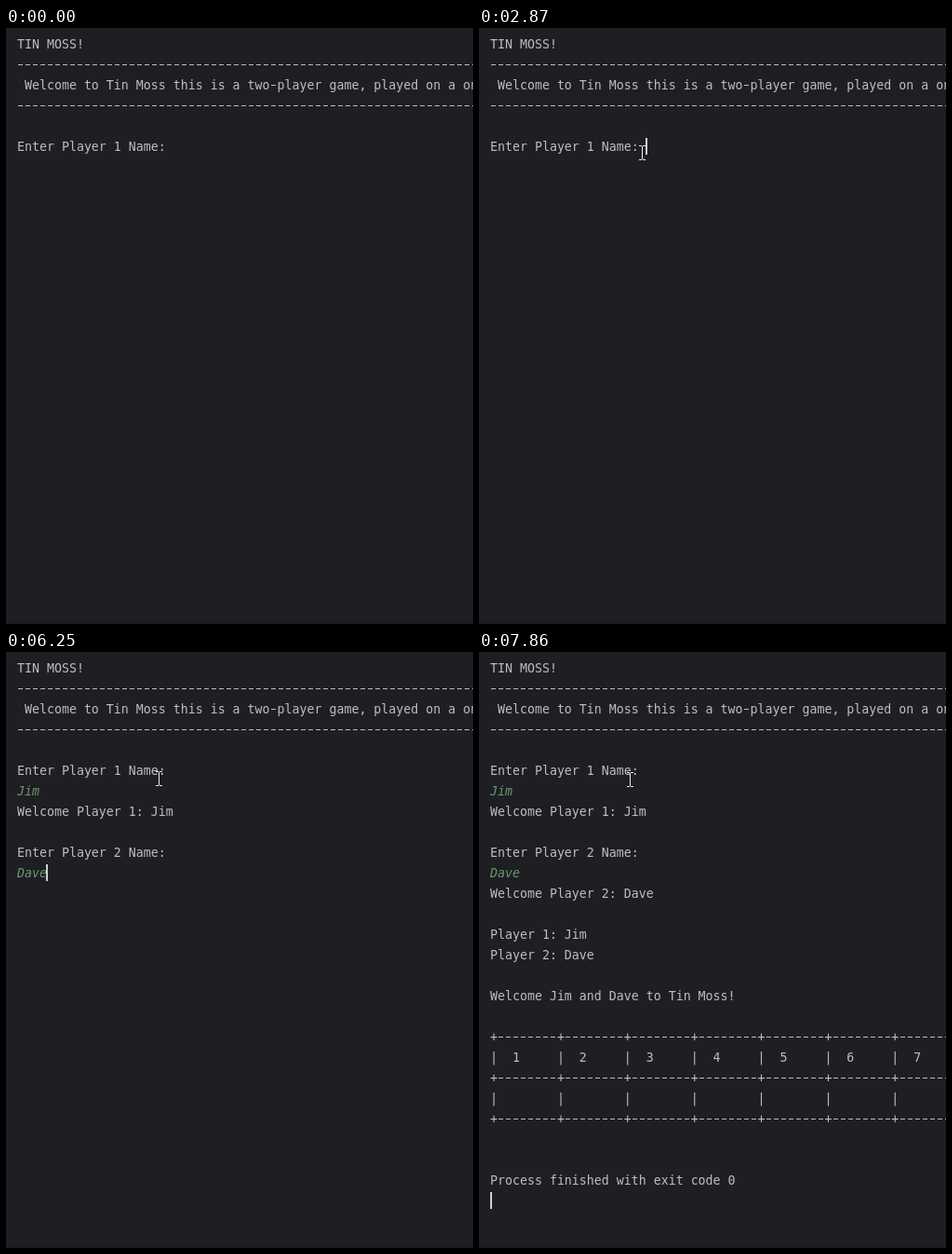
Write an HTML page with a canvas that moves like this. It is 502 px wide and 640 px high and loops after 8 s.

```html
<!DOCTYPE html>
<html lang="en">
<head>
<meta charset="utf-8">
<title>Console game</title>
<style>
html, body { margin: 0; width: 100%; height: 100%; overflow: hidden; background: #1e1f22; }
canvas { display: block; }
</style>
</head>
<body>
<canvas width="502" height="640"></canvas>
<script>
const ctx = document.querySelector("canvas").getContext("2d", { alpha: false });
const LOOP = 8000, TICK = 67, LEFT = 12, TOP = 8, CELL = 8, LINE = 22;
const FONT = "13.288px 'DejaVu Sans Mono', monospace";
const PLAIN = "#bcbec4", INPUT = "#6c9570";

// The console is a log of timed strings; the caret sits at its end.
const log = [];
const inputRows = [6, 10];

function print(time, text) {
  log.push({ time, text });
}

function type(start, name, gap, slowdown) {
  [...name].forEach((key, i) => print(start + gap * i + slowdown * i * i, key));
}

const rule = "-".repeat(62);
const border = "+--------".repeat(7) + "\n";
const numbers = Array.from({ length: 7 }, (_, i) => `|  ${i + 1}     `).join("") + "\n";
const blanks = "|        ".repeat(7) + "\n";

print(0, `TIN MOSS!\n${rule}\n Welcome to Tin Moss this is a two-player game, played on a one\n${rule}\n\n`);
print(0, "Enter Player 1 Name: ");
print(3730, "\n");
type(3730, "Jim", 135, 65);
print(4860, "\n");
print(5120, "Welcome Player 1: Jim\n\nEnter Player 2 Name: \n");
type(5860, "Dave", 130, 0);
print(6990, "\nWelcome Player 2: Dave\n\nPlayer 1: Jim\nPlayer 2: Dave\n\n");
print(6990, "Welcome Jim and Dave to Tin Moss!\n\n" + border);
print(7180, numbers + border + blanks + border + "\n");
print(7720, "\nProcess finished with exit code 0\n");

// Each move runs in ticks from the place where the previous one ended.
const pointerStart = { x: 370, y: 436 };
const moves = [
  { from: 1460, to: 2070, x: 187, y: 135, ease: 1.5 },
  { from: 2210, to: 2330, x: 182, y: 123, ease: 1 },
  { from: 2870, to: 2930, x: 161, y: 128, ease: 1 },
  { from: 7860, to: 7860, x: 159, y: 129, ease: 1 },
];

const between = (t, from, to) => t >= from && t < to;

function drawLine(text, row) {
  const y = TOP + row * LINE, isInput = inputRows.includes(row);
  ctx.font = (isInput ? "italic " : "") + FONT;
  ctx.fillStyle = isInput ? INPUT : PLAIN;
  ctx.fillText(text.replaceAll("-", " "), LEFT, y + 14);
  // Hyphens are wider than the font's own
  [...text].forEach((char, col) => {
    if (char === "-") ctx.fillRect(LEFT + col * CELL + 1, y + 9, 5, 1);
  });
}

function drawCaret(t, row, col) {
  if (t < 2540 || between(t, 3070, 3530)) return;
  ctx.fillStyle = "#ced0d6";
  ctx.fillRect(LEFT + col * CELL - (col ? 1 : 0), TOP + row * LINE, 2, 18);
}

function drawClick(t) {
  if (!between(t, 2540, 2730)) return;
  ctx.fillStyle = "rgba(255, 255, 0, .47)";
  ctx.beginPath();
  ctx.arc(183, 130, 12, 0, 2 * Math.PI);
  ctx.fill();
}

function drawPointer(t) {
  if (t < moves[0].from) return;
  let { x, y } = pointerStart;
  for (const move of moves.filter(m => t >= m.from)) {
    const steps = Math.round((move.to - move.from) / TICK) + 1;
    const step = Math.min(steps, Math.floor((t - move.from) / TICK + 0.1) + 1);
    const left = (1 - step / steps) ** move.ease;
    x = Math.round(move.x + (x - move.x) * left);
    y = Math.round(move.y + (y - move.y) * left);
  }
  ctx.fillStyle = "#f0f0f0";
  for (const end of [y, y + 15]) {
    ctx.fillRect(x, end, 3, 1);
    ctx.fillRect(x + 4, end, 3, 1);
  }
  ctx.fillRect(x + 3, y + 1, 1, 14);
}

function draw(t) {
  ctx.fillStyle = "#1e1f22";
  ctx.fillRect(0, 0, 502, 640);
  ctx.fillStyle = "#1c1c23";
  ctx.fillRect(0, 635, 502, 5);

  const lines = log.filter(entry => t >= entry.time).map(entry => entry.text).join("").split("\n");
  lines.forEach(drawLine);
  drawCaret(t, lines.length - 1, lines.at(-1).length);
  drawClick(t);
  drawPointer(t);
}

function frame() {
  draw(performance.now() % LOOP);
  requestAnimationFrame(frame);
}
frame();
</script>
</body>
</html>
```
